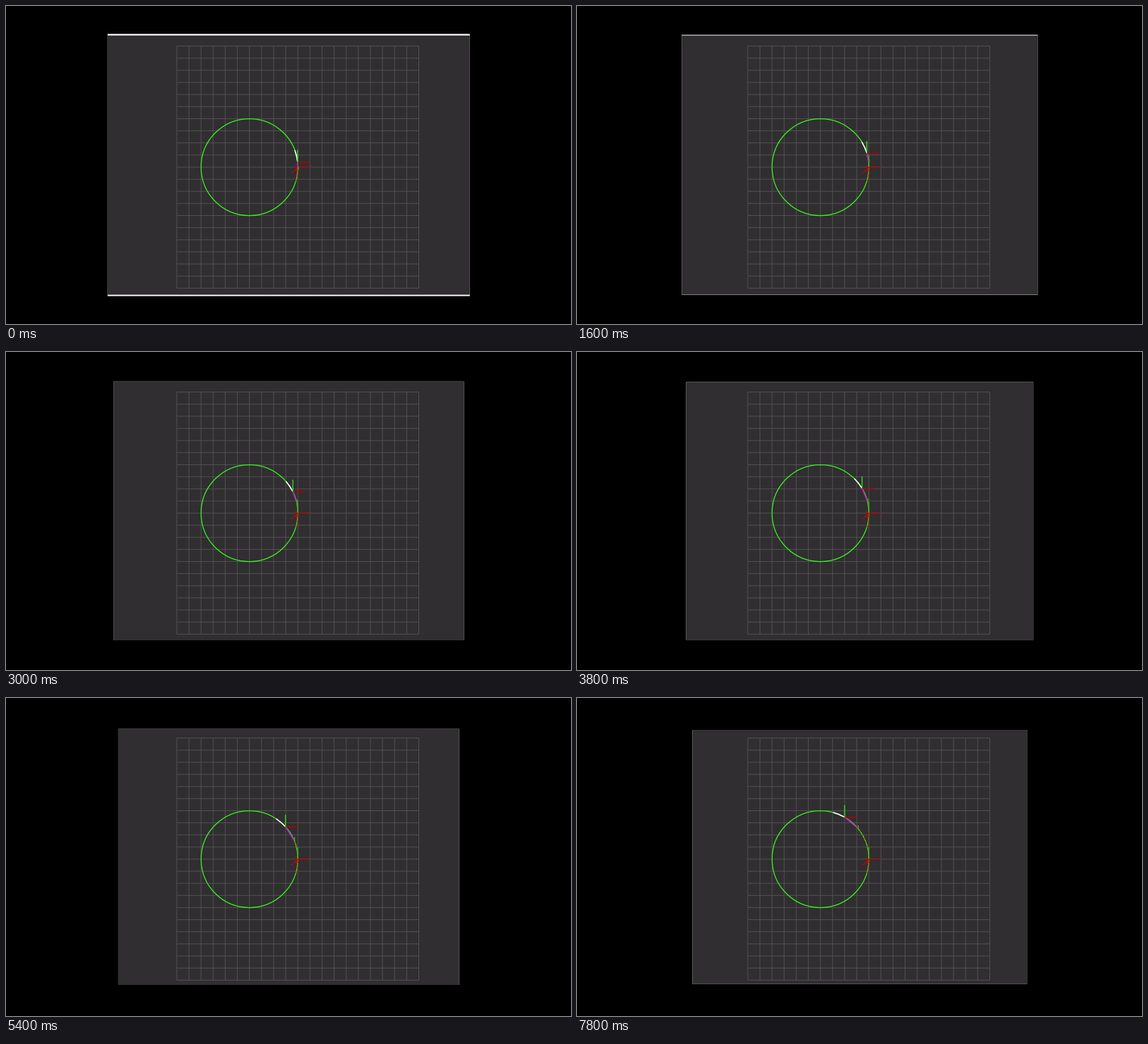
These frames come from a looping animation (800 px wide and 450 px high, 8000 ms). An HTML page:

```html
<!DOCTYPE html>
<html lang="en">
<head>
<meta charset="utf-8">
<title>Path follower</title>
<style>
html, body { margin: 0; width: 100%; height: 100%; overflow: hidden; background: #000; }
svg { display: block; width: 100%; height: 100%; }
path { fill: none; }
</style>
</head>
<body>
<svg viewBox="0 0 800 450">
  <clipPath id="clip"><rect id="view"/></clipPath>
  <g clip-path="url(#clip)">
    <rect width="800" height="450" fill="#fff"/>
    <rect y="41.7" width="800" height="366.9" fill="#302e30"/>
    <path id="grid" stroke="#575557" stroke-width="0.9"/>
    <circle id="loop" fill="none" stroke="#35f51e" stroke-width="1.25"/>
    <path id="trail" stroke="#a8480c" stroke-width="1.2" stroke-dasharray="4 2" opacity="0.8"/>
    <g id="base">
      <path d="M413.2 228V211" stroke="#22c81e" stroke-width="1.2"/>
      <path d="M409 228.4H430.4" stroke="#b80000" stroke-width="1.4"/>
      <path d="M403.5 235.6H407M407 234.5L413 228M409.5 225.5L414 233.5M411.5 231V236" stroke="#b4080c" stroke-width="1.3"/>
      <path d="M413 235V248" stroke="#a02010" opacity="0.5"/>
    </g>
    <path id="ahead" stroke="#fff" stroke-width="1.5"/>
    <path id="chord" stroke="#c018c8" stroke-width="1.6"/>
    <g id="tail">
      <path d="M0 0H3" stroke="#a80c08" stroke-width="1.3"/>
      <path d="M.8 1V-4" stroke="#20b828" stroke-width="1.5"/>
    </g>
    <g id="lead">
      <path d="M0 0H17.1" stroke="#b40000" stroke-width="1.4"/>
      <path d="M0 0V-17.1" stroke="#2ade1e" stroke-width="1.4"/>
    </g>
  </g>
</svg>
<script>
const LOOP = 8000, STEP = 200;
const CX = 344.7, CY = 228, R = 68.5, CELL = 17.13;
// seconds, leading angle, trailing angle
const KEYS = [
  [0, 5.9, -3], [1.6, 16.6, 6.5], [2.4, 22.8, 11.5], [3.8, 30.7, 14],
  [4.6, 36.8, 19], [6.4, 48.1, 28.3], [7.8, 60, 39.8]
];
const $ = id => document.getElementById(id);
const set = (id, attrs) => {
  for (const k in attrs) $(id).setAttribute(k, attrs[k]);
};

function point(deg) {
  const a = deg * Math.PI / 180;
  return [CX + R * Math.cos(a), CY - R * Math.sin(a)];
}

function arc(from, to) {
  return `M${point(from)}A${R} ${R} 0 0 0 ${point(to)}`;
}

function angles(s) {
  let i = 1;
  while (i < KEYS.length - 1 && KEYS[i][0] < s) i++;
  const a = KEYS[i - 1], b = KEYS[i];
  const u = (s - a[0]) / (b[0] - a[0]);
  return [1, 2].map(k => a[k] + (b[k] - a[k]) * u);
}

function drawGrid() {
  let d = '';
  const x0 = 241.9, y0 = 56.7, size = 20 * CELL;
  for (let i = 0; i <= 20; i++) {
    d += `M${x0 + i * CELL} ${y0}v${size}M${x0} ${y0 + i * CELL}h${size}`;
  }
  set('grid', { d });
}

function render(ms) {
  const s = Math.floor(ms % LOOP / STEP) * STEP / 1000;
  const zoom = Math.min(s, 7);
  const x = 143.8 + 2.8 * zoom, y = 39.4 + 0.8 * zoom;
  set('view', { x, y, width: 800.6 - 2 * x, height: 449.8 - 2 * y });

  const [lead, tail] = angles(s);
  const p = point(lead), q = point(tail);
  set('trail', { d: arc(-17, tail) });
  set('ahead', { d: arc(lead + 0.5, lead + 14.7) });
  set('chord', { d: `M${p}L${q}` });
  set('tail', { transform: `translate(${q})` });
  set('lead', { transform: `translate(${p})` });
}

drawGrid();
set('loop', { cx: CX, cy: CY, r: R });
const start = performance.now();
function tick() {
  render(performance.now() - start);
  requestAnimationFrame(tick);
}
tick();
</script>
</body>
</html>
```
